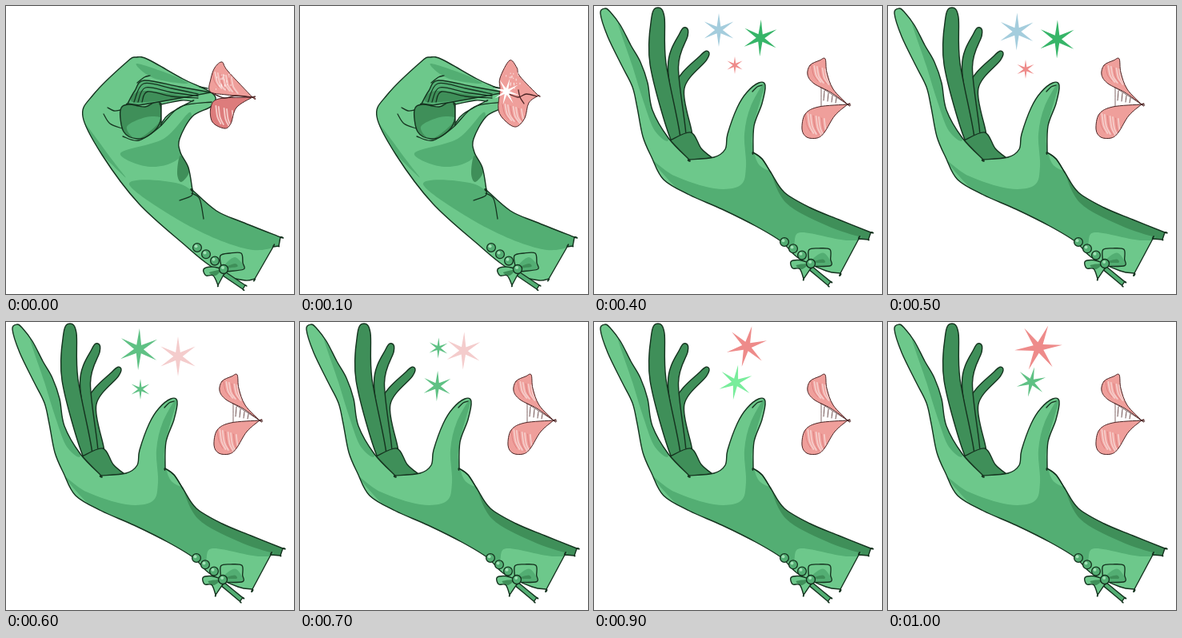
These frames come from a looping animation (360 by 360 pixels, 1100 ms). An HTML page with a canvas:

```html
<!DOCTYPE html>
<html lang="en">
<head>
<meta charset="utf-8">
<title>Gloved hand, lips and stars</title>
<style>
html, body { margin: 0; width: 100%; height: 100%; overflow: hidden; background: #fff; }
canvas { display: block; width: 100vmin; height: 100vmin; }
</style>
</head>
<body>
<canvas id="stage" width="360" height="360"></canvas>
<script>
const ctx = document.getElementById('stage').getContext('2d');
const LIGHT = '#6dc88b', MID = '#53ae73', DARK = '#3f8f59', INK = '#15331f';
const PINK = '#ef9f9b', ROSE = '#dd7c7c', BLUSH = '#f6ccc9', LIP_INK = '#4b2424';
const CORAL = '#ee8b8a', PALE = '#f4cccc', SKY = '#a4cddd';
const GREEN = '#36b568', LEAF = '#5fc184', MINT = '#79ed9c';

const mix = (a, b, k) => a + (b - a) * k;
const same = p => p;

// Parses "x,y" points; a trailing * doubles a point into a sharp corner.
const parse = text => text.trim().split(/\s+/).flatMap(s => {
  const p = s.replace('*', '').split(',').map(Number);
  return s.endsWith('*') ? [p, p] : [p];
});

// Smooth path through the points.
function curve(pts, closed = true) {
  const n = pts.length;
  const at = i => closed ? pts[(i + n) % n] : pts[Math.max(0, Math.min(n - 1, i))];
  const path = new Path2D();
  path.moveTo(...pts[0]);
  for (let i = 0; i < (closed ? n : n - 1); i++) {
    const [a, b, c, d] = [at(i - 1), at(i), at(i + 1), at(i + 2)];
    path.bezierCurveTo(b[0] + (c[0] - a[0]) / 6, b[1] + (c[1] - a[1]) / 6,
      c[0] - (d[0] - b[0]) / 6, c[1] - (d[1] - b[1]) / 6, ...c);
  }
  if (closed) path.closePath();
  return path;
}

function line(text, color = INK, width = 1.3) {
  ctx.strokeStyle = color;
  ctx.lineWidth = width;
  ctx.stroke(curve(parse(text), false));
}

// Fills an outline, runs the details clipped to it, then inks the edge.
function ink(path, fill, details, color = INK, width = 1.4) {
  ctx.fillStyle = fill;
  ctx.fill(path);
  ctx.save();
  ctx.clip(path);
  if (details) details();
  ctx.restore();
  ctx.strokeStyle = color;
  ctx.lineWidth = width;
  ctx.stroke(path);
}

const part = (text, fill, details, warp = same) => ink(curve(parse(text).map(warp)), fill, details);

function shade(color, text, warp = same) {
  ctx.fillStyle = color;
  ctx.fill(curve(parse(text).map(warp)));
}

function disc(x, y, r, color, edge) {
  const path = new Path2D();
  path.arc(x, y, r, 0, 7);
  ctx.fillStyle = color;
  ctx.fill(path);
  if (edge) ctx.stroke(path);
}

function star(x, y, r, color, turn = 0, points = 6) {
  ctx.beginPath();
  for (let i = 0; i < points * 2; i++) {
    const a = (turn - 90 + i * 180 / points) * Math.PI / 180;
    const d = i % 2 ? r * 0.23 : r;
    ctx.lineTo(x + d * Math.cos(a), y + d * Math.sin(a));
  }
  ctx.closePath();
  ctx.fillStyle = color;
  ctx.fill();
}

// Three buttons in a row, then the bow.
function trim(x, y, turn) {
  ctx.strokeStyle = INK;
  ctx.lineWidth = 1.3;
  for (let i = 0; i < 3; i++) {
    const bx = x + i * 11, by = y + i * 8.3;
    disc(bx, by, 5.4, MID, true);
    disc(bx - 1.5, by - 1.8, 2, '#9fe0b4');
  }
  ctx.save();
  ctx.translate(x + 33, y + 27);
  ctx.rotate(turn);
  part('3,4* 27,20* 24,25* -1,8*', MID);
  part('-4,-1* -15,-3 -25,0 -22,8 -13,8 -7,20* 1,5*', LIGHT, () => shade(DARK, '-4,1 -18,4 -10,8'));
  part('-3,-4* -4,-17 8,-20 22,-20 24,-8 25,0 4,3*', LIGHT, () => {
    shade(MID, '0,-3 14,-15 25,-2 10,3');
    shade(DARK, '2,-2 14,-7 17,-3');
  });
  disc(0, 0, 5.5, MID, true);
  disc(-1, -2, 2, '#9fe0b4');
  ctx.restore();
}

function pinchHand() {
  part(`343,289* 295,270 263,256 233,230* 228,202 218,183 217,166 233,138 257,125 259,110 221,91
    178,67 163,64 151,70 109,111 96,138 120,186 166,247 226,301 250,321 275,337 299,343
    311,341* 334,301* 341,300*`, LIGHT, () => {
    shade(MID, '163,72 204,85 227,97 184,90');
    shade(MID, '143,184 197,166 231,133 219,187 180,201');
    shade(MID, '154,223 216,222 262,253 345,289 309,305 233,277');
    shade(MID, '97,145 134,194 149,214 110,174');
    shade(DARK, '218,187 229,206 219,220 214,209');
  });
  part('143,130 153,123 174,126 191,119 193,144 181,160 164,166 147,157', DARK,
    () => shade(MID, '151,151 175,139 194,142 165,166'));
  part('152,122* 161,106 173,93 217,101 256,108* 213,116 166,124*', MID,
    () => shade(DARK, '158,120 171,106 239,116 201,118'));
  for (const drop of [0, 5, 10]) {
    line(`${160 + drop},120 ${172 + drop / 2},${97 + drop} 207,${103 + drop} 240,${110 + drop / 2}`);
  }
  line('164,96 173,89 180,87');
  part('194,123* 219,118 232,119* 204,135 194,147*', '#fff');
  line('257,120 218,126 191,152 166,168 146,163');
  line('122,135 130,147 145,153');
  line('127,127 135,131 143,130');
  line('217,243 232,237 233,229');
  line('232,234 242,241 247,266');
  line('242,101 252,103');
  trim(239, 302, 0);
}

// A finger widens to its knee and narrows to a pointed tip.
function finger(base, knee, tip, w) {
  const side = (p, from, to, d) => {
    const dx = to[0] - from[0], dy = to[1] - from[1], len = Math.hypot(dx, dy);
    return [p[0] - dy / len * d, p[1] + dx / len * d];
  };
  const neck = knee.map((v, i) => mix(v, tip[i], 0.83));
  const edge = s => [
    side(base, base, knee, s * w * 0.6),
    side(knee, base, tip, s * w),
    side(neck, knee, tip, s * w * 0.8)
  ];
  ink(curve([...edge(-1), tip, ...edge(1).reverse()]), DARK);
}

// The upright pose is the leaning one with its first finger swung to the right.
function openHand(upright) {
  const swing = ([x, y]) => [x + (x < 100 ? 50 * upright * Math.max(0, 1 - y / 230) ** 1.9 : 0), y];
  ctx.save();
  ctx.translate(2 * upright, -4 * upright);
  const lift = 5 * upright;
  finger([119, 160], [107, 102 + lift], [143, 57 + lift * 1.8], 6);
  finger([111, 161], [99, 76 + lift], [115, 27 + lift * 1.4], 6.5);
  finger([102, 166], [80, 72 + lift], [80, 2 + lift], 10);
  part('95,168* 121,158 134,178 148,190* 119,193*', DARK);
  part(`8,9 14,3 20,7 33,24 46,49 58,70 67,96 73,130 93,165 119,192* 150,189 164,179 167,160 179,127
    191,108 206,96 214,99 210,122 200,150 199,183* 210,191 221,208 238,233 270,252 306,267 346,283*
    343,292* 331,291* 308,334* 290,331 254,314 235,295 202,275 160,254 119,236 87,217 72,189 61,163
    54,127 48,101 35,75 17,38`, LIGHT, () => {
    shade(MID, '30,20 58,70 67,96 93,165 76,156 62,120 48,75', swing);
    shade(MID, `214,96 200,150 205,186 270,250 350,284 318,293 258,283 246,300 202,278 119,240 72,192
      100,212 150,228 183,224 190,200 188,160 196,125`);
    shade(DARK, '221,206 238,233 270,252 350,283 336,289 290,274 240,246');
    shade(LIGHT, '201,184 211,190 218,205 206,198');
    shade(DARK, '331,291* 346,284* 343,292* 325,310*');
  }, swing);
  line('199,183 210,191 221,208');
  line('198,107 204,101 210,99');
  trim(238, 295, 0.1);
  ctx.restore();
}

// One lip, with pale creases fanning out towards the mouth corner.
function lip(text, fill, x, y, dx, dy) {
  ink(curve(parse(text)), fill, () => {
    for (let i = 0; i < 8; i++) {
      const px = x + i * 3.4, py = y + i;
      line(`${px},${py} ${px + dx * 0.3},${py + dy * 0.6} ${px + dx},${py + dy}`,
        i % 3 ? BLUSH : ROSE, i % 3 ? 1.8 : 0.9);
    }
  }, LIP_INK, 1);
}

function glints(x, y, count) {
  let seed = 7;
  const rand = () => (seed = seed * 16807 % 2147483647) / 2147483647;
  ctx.fillStyle = 'rgba(255,255,255,.7)';
  while (count--) ctx.fillRect(x + rand() * 20, y + rand() * 23, 1, 1 + rand() * 2);
}

function lipsPursed() {
  lip('255,107 256,91 261,77 270,70 277,81 308,114* 276,111', PINK, 258, 82, 8, 20);
  lip('308,114* 288,127 281,147 273,153 258,145 256,127 266,116', ROSE, 259, 124, 6, 22);
  glints(262, 82, 20);
  line('258,109 273,115 287,112 306,114', LIP_INK);
}

function lipsKissing() {
  lip('250,105 250,90 262,68 271,77 275,88 298,112* 286,121 281,140 270,151 257,144 248,130',
    PINK, 253, 122, 8, 20);
  glints(256, 80, 20);
  line('261,110 273,114 283,110 296,113', LIP_INK);
  line('273,105 275,114 280,122', LIP_INK);
  star(258, 107, 17, '#fff', 15, 8);
}

function lipsParted() {
  lip('264,91 270,78 289,69 296,82 315,117* 284,109', PINK, 268, 82, 9, 22);
  lip('315,117* 296,137 291,155 282,164 262,156 264,133 279,122', PINK, 264, 130, 8, 26);
}

function lipsOpen() {
  ink(curve(parse('284,102* 317,123* 284,127*')), '#fff', null, LIP_INK, 0.7);
  for (let i = 0; i < 4; i++) line(`${288 + i * 5},${106 + i * 3} ${287 + i * 5},${118 + i}`, LIP_INK, 0.8);
  lip('270,74 282,68 289,66 291,83 299,104 317,123* 296,108 275,97 267,86', PINK, 272, 74, 8, 20);
  lip('317,123* 301,137 288,158 279,165 266,164 260,154 264,135 281,126', PINK, 264, 134, 7, 24);
}

// Star keys: time, x, y, radius, turn, color. Size and place glide, color switches.
const tracks = [
  [[400, 156, 30, 21, 0, SKY], [600, 166, 34, 26, 2, LEAF], [800, 180, 31, 0, 2, LEAF]],
  [[300, 192, 43, 31, 0, CORAL], [400, 208, 40, 23, 2, GREEN], [600, 215, 43, 25, 0, PALE],
    [800, 194, 29, 22, 4, CORAL], [1000, 188, 32, 30, 24, CORAL]],
  [[300, 163, 79, 17, 5, PALE], [400, 176, 74, 11, 0, CORAL], [600, 168, 84, 13, 0, LEAF],
    [800, 175, 76, 25, 4, MINT], [1000, 179, 75, 19, 12, LEAF]]
];

function drawStar(track, t) {
  const i = track.findLastIndex(key => key[0] <= t);
  if (i < 0) return;
  const from = track[i], to = track[i + 1] || from;
  const k = to === from ? 0 : (t - from[0]) / (to[0] - from[0]);
  const [x, y, r, turn] = [1, 2, 3, 4].map(j => mix(from[j], to[j], k));
  star(x, y, r, from[5], turn);
}

function draw(t) {
  ctx.fillStyle = '#fff';
  ctx.fillRect(0, 0, 360, 360);
  if (t < 300) pinchHand();
  else openHand(t < 400 ? 1 : 0);
  const lips = t < 100 ? lipsPursed : t < 300 ? lipsKissing : t < 400 ? lipsParted : lipsOpen;
  lips();
  tracks.forEach(track => drawStar(track, t));
}

// The picture is held for steps of 100 ms.
let shown;
function frame(now) {
  const t = Math.floor(now % 1100 / 100) * 100;
  if (t !== shown) draw(shown = t);
  requestAnimationFrame(frame);
}

ctx.lineCap = ctx.lineJoin = 'round';
frame(0);
</script>
</body>
</html>
```
